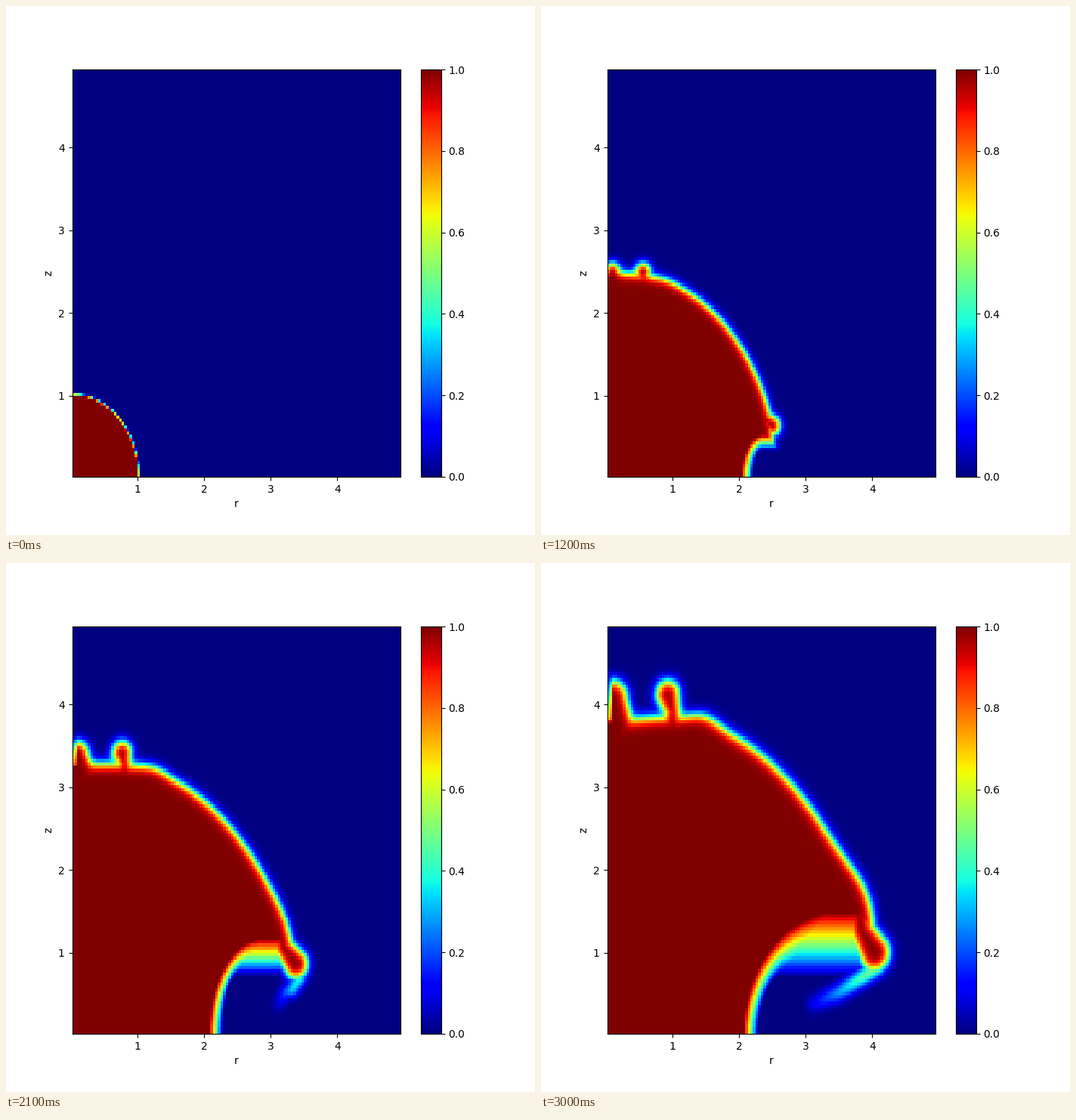
A matplotlib script for the animation above (3300 ms loop, 700 px wide and 700 px high).

```python
import numpy as np
import matplotlib.pyplot as plt
from matplotlib.animation import FuncAnimation

FRAMES = 11
STEP_MS = 300
N = 126               # visible cells per side
H = 5 / 128           # cell size

edges = (np.arange(N + 1) + 0.5) * H
centers = (np.arange(N) + 1) * H
R, Z = np.meshgrid(centers, centers)


def slowing(u, pace):
    """Quadratic ease from 0 to 1 with the given starting speed."""
    return pace * u + (1 - pace) * u * u


def blend(signed, width):
    """Soft step across a boundary, 1 on the positive side."""
    return 0.5 + 0.5 * np.tanh(signed / width)


def bump(angle, middle, spread):
    return np.exp(-((angle - middle) / spread) ** 2)


def nearest(points):
    """Distance of each cell to a polyline and the place along it."""
    best = np.full(R.shape, np.inf)
    place = np.zeros(R.shape)
    for k, ((r0, z0), (r1, z1)) in enumerate(zip(points, points[1:])):
        dr, dz = r1 - r0, z1 - z0
        along = ((R - r0) * dr + (Z - z0) * dz) / (dr * dr + dz * dz)
        along = np.clip(along, 0, 1)
        dist = np.hypot(R - r0 - along * dr, Z - z0 - along * dz)
        closer = dist < best
        best = np.where(closer, dist, best)
        place = np.where(closer, k + along, place)
    return best, place


def limb(points, radii):
    """Signed depth inside a rounded stroke of varying radius."""
    dist, place = nearest(points)
    return np.interp(place, np.arange(len(radii)), radii) - dist


def first_field():
    """Share of each cell covered by the unit circle."""
    sub = 12
    x = (np.arange(N * sub) + 0.5) * H / sub
    inside = np.hypot(x[None, :], x[:, None]) < 1
    return inside.reshape(N, sub, N, sub).mean(axis=(1, 3))


def dome(u):
    """Expanding circle, dented at the axis, with two growing lobes."""
    angle = np.degrees(np.arctan2(R, Z))
    front = (1 + 3.12 * slowing(u, 1.44)
             - 0.31 * u ** 1.3 * bump(angle, 0, 17)
             + 0.08 * u ** 2 * bump(angle, 21, 4)
             + 0.15 * u ** 4 * bump(angle, 67, 8))
    return front - np.hypot(R, Z)


def fingers(u, tip, valley):
    """A blunt finger on the axis and a thin one with a round head."""
    top = 0.21 * u ** 0.8
    first = limb([(0.1, valley - 0.1), (0.1, tip - top)], [0.12 + 0.2 * u, top])

    head = 0.16 * u ** 0.5
    r = 0.2 + 0.73 * slowing(u, 1.38)
    stem = r + 0.07 * u ** 2
    second = limb([(stem, valley - 0.15), (stem, tip - 0.36 * u),
                   (r, tip - head)], [0.14 * u, 0.11 * u ** 0.5, head])
    return first, second


def cavity(u):
    """Stack of nested elliptic arches, one for each level."""
    k = np.linspace(0, 1, 40)[:, None, None]
    wall = 1 + 1.18 * (1 - (1 - u) ** 6)
    start = wall + (0.16 + 0.06 * u) * (0.5 - k)
    span = 0.05 + (0.3 + 1.08 * k) * u ** 1.7
    roof = 1.48 * u * u * (3 - 2 * u) - 0.76 * u ** 1.6 * (1 - k)
    v = np.clip((R - start) / span, 0, 1)
    arch = np.where(R > start, roof * np.sqrt(1 - (1 - v) ** 2), -1)
    return (Z > arch).mean(axis=0)


def tail(u, r, z):
    """Faint stream bent back from the hook's underside."""
    amount = np.clip((u - 0.4) / 0.4, 0, 1)
    end_r = min(r - 0.05, 3.12)
    path = [(r + 0.06, z - 0.17), (0.78 * r + 0.22 * end_r, z - 0.31),
            (0.42 * r + 0.58 * end_r, 0.52), (end_r, 0.38)]
    dist, place = nearest(path)
    level = np.interp(place, [0, 1, 2, 3], [0.52, 0.44, 0.28, 0.1])
    return amount * level * np.exp(-(dist / (0.06 + 0.05 * u)) ** 2)


def thin_axis(c, u, tip, valley):
    """Diluted cells along the axis of the first finger."""
    depth = (tip - centers) / max(tip - valley, 0.05)
    level = np.interp(depth, [-0.4, 1, 1.1], [0, 0.7, 1])
    amount = np.clip(2.5 * u - 1, 0, 1)
    for col, share in enumerate((1, 0.65)):
        c[:, col] += amount * share * (level - c[:, col])


def field(u):
    if u == 0:
        return first_field()
    width = 0.05 + 0.035 * u
    tip = 0.98 + 3.295 * slowing(u, 1.37)
    valley = 0.99 + 2.83 * slowing(u, 1.52)

    # Hook: a neck hanging from the front with a round head.
    size = slowing(u, 1.4)
    r, z = 1 + 3.03 * size, 0.2 + 0.806 * slowing(u, 1.6)
    neck = limb([(r - 0.26, z + 0.6 * size), (r - 0.19, z + 0.26 * size), (r, z)],
                np.array([0.16, 0.16, 0.21]) * size)

    parts = np.stack([dome(u), *fingers(u, tip, valley)])
    body = 0.03 * np.logaddexp.reduce(parts / 0.03, axis=0)
    c = np.minimum(blend(body, width), blend(r - R, width))
    c = np.minimum(c, cavity(u))
    c = np.maximum(c, blend(neck, width))
    c = np.maximum(c, tail(u, r, z))
    thin_axis(c, u, tip, valley)
    return c


fig, ax = plt.subplots(figsize=(7, 7), dpi=100)
mesh = ax.pcolormesh(edges, edges, field(0), cmap="jet", vmin=0, vmax=1)
ax.set_xlabel("r")
ax.set_ylabel("z")
fig.colorbar(mesh, ax=ax)


def update(frame):
    mesh.set_array(field(frame / (FRAMES - 1)))
    return (mesh,)


anim = FuncAnimation(fig, update, frames=FRAMES, interval=STEP_MS,
                     repeat=True, repeat_delay=0)
plt.show()
```
